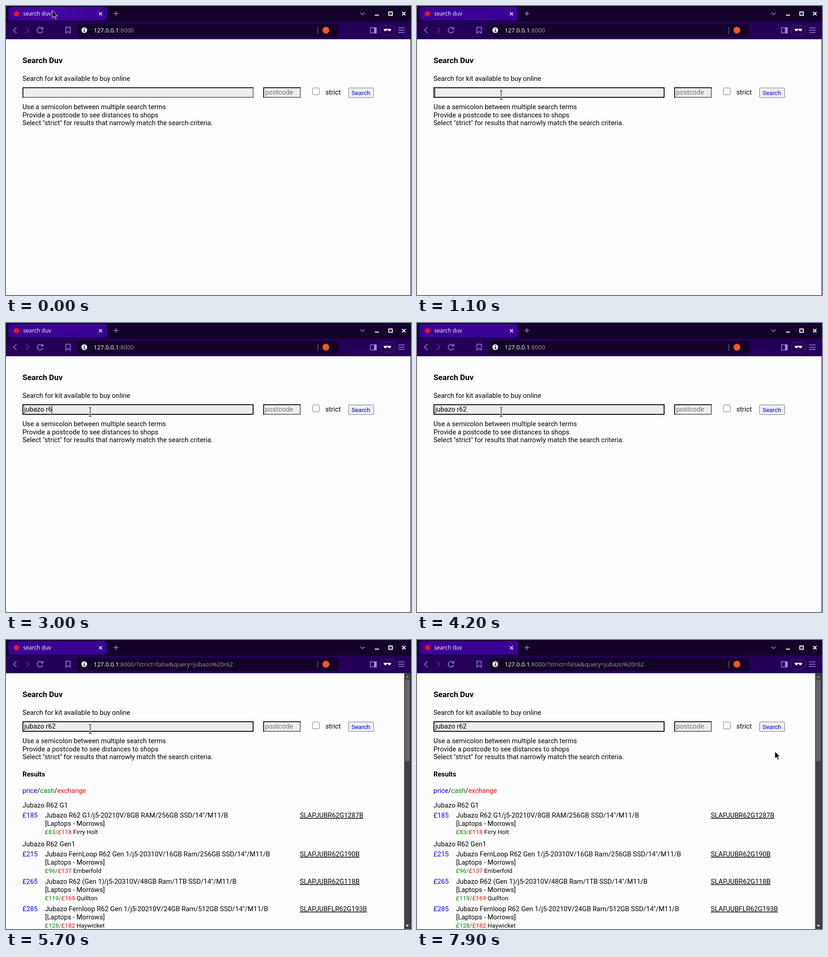
Animation of 885x633 px, one loop 8 s. Source, as an HTML page:

```html
<!DOCTYPE html>
<html lang="en">
<head>
<meta charset="utf-8">
<title>search duv</title>
<style>
  html, body { margin: 0; width: 100%; height: 100%; overflow: hidden; background: #fdfdfd; }
  svg { display: block; width: 885px; height: 633px; }
  text { font: 14.72px Roboto, sans-serif; white-space: pre; }
  .ui { font: 13px "Noto Sans", sans-serif; }
  .tab { font-size: 12px; }
  .bold { font-weight: bold; }
  .h3 { font-size: 17.22px; }
  .small { font-size: 13.333px; }
  .price { fill: #00f; }
  .cash { fill: #008000; }
  .exchange { fill: #f00; }
  .code { text-decoration: underline; }
  .icon { fill: none; stroke: #9a85ee; stroke-width: 1.5; }
  .white { fill: none; stroke: #fff; stroke-width: 2; }
</style>
</head>
<body>
<svg viewBox="0 0 885 633">
  <defs>
    <radialGradient id="glow" gradientUnits="userSpaceOnUse" cx="102" cy="12" r="110">
      <stop offset="0" stop-color="#4608a4"/><stop offset="1" stop-color="#3b0095"/>
    </radialGradient>
  </defs>

  <!-- window frame -->
  <rect width="885" height="72.5" fill="#140429"/>
  <rect y="34" width="885" height="38.5" fill="#240058"/>
  <path d="M884.5 72V633" stroke="#240058"/>
  <rect id="tab" x="5" y="2" width="216" height="30" rx="6" fill="#3b0095"/>
  <circle cx="23" cy="17" r="5.8" fill="#f0101c"/>
  <text class="ui tab" x="37.500" y="21" fill="#f1edfa">search duv</text>
  <path class="icon" d="M203 13.500l7 7m0-7l-7 7" style="stroke:#fff"/>
  <path class="icon" d="M235 16.500h10.500m-5.250-5.250v10.500"/>
  <path class="icon" d="M774.500 14.500l4.500 4.500 4.500-4.500"/>
  <path class="white" d="M806 20h9M836.500 13h7.500v7.500h-7.500zM865.500 13l7.500 7.500m0-7.500l-7.500 7.500"/>

  <!-- toolbar -->
  <path class="icon" d="M23 46.500l-6.500 6.500 6.500 6.500"/>
  <path class="icon" d="M43.500 46.500l6.500 6.500-6.500 6.500" style="stroke:#553a91"/>
  <path class="icon" d="M79.500 49.500a6.200 6.200 0 1 0 .8 5M80.500 46v4.500h-4.500"/>
  <path class="icon" d="M131 46.500h9.500v13l-4.750-3.500-4.750 3.500z"/>
  <rect x="156" y="39" width="571" height="29" rx="7" fill="#140429"/>
  <circle cx="171" cy="53" r="6.200" fill="#fff"/>
  <path d="M171 49v2m0 1.200v5" stroke="#140429" stroke-width="2"/>
  <text class="ui" x="191.500" y="58" fill="#f4f2f8">127.0.0.1<tspan id="address" fill="#948da1"></tspan></text>
  <path d="M681.500 46v15" stroke="#8c8598"/>
  <circle cx="699" cy="53" r="7.500" fill="#fb542b"/>
  <path class="icon" d="M796.500 47.500h12.500v11.500h-12.500z"/>
  <path d="M804 47h6v13h-6z" fill="#9a85ee"/>
  <rect x="818.500" y="42.500" width="30" height="21" rx="6" fill="none" stroke="#4b2a8c"/>
  <path d="M825 50h17v1.500h-1l-1 3.500h-4l-1.500-3h-2l-1.500 3h-4l-1-3.500h-1z" fill="#fff"/>
  <path class="icon" d="M857 48h14m-14 5h14m-14 5h14"/>

  <!-- search form -->
  <text class="bold h3" x="36" y="125">Search Duv</text>
  <text x="36" y="164">Search for kit available to buy online</text>
  <g id="fields" stroke-width="2"></g>
  <rect id="focus" x="37" y="179" width="503" height="21" rx="2" fill="#ededed" stroke="#101010" stroke-width="2"/>
  <text id="query" x="39.800" y="194"></text>
  <path id="caret" stroke="#000"/>
  <text x="566" y="194" fill="#757575">postcode</text>
  <rect x="669.500" y="179.500" width="15" height="15" rx="2.500" fill="#fff" stroke="#767676"/>
  <text x="698" y="194">strict</text>
  <rect x="748.500" y="179.500" width="55" height="21" rx="1" fill="#efefef" stroke="#767676"/>
  <text class="small price" x="755" y="195">Search</text>
  <text x="36" y="226">Use a semicolon between multiple search terms</text>
  <text x="36" y="244">Provide a postcode to see distances to shops</text>
  <text x="36" y="261">Select "strict" for results that narrowly match the search criteria.</text>

  <g id="results"></g>

  <path id="arrow" d="M0 0v16l3.700-3.400 2.700 6 2.400-1-2.600-6h4.900z" fill="#000" stroke="#fff"/>
  <g id="beam" fill="none">
    <path d="M-3.500-9.500h7M0-9.500v19M-3.500 9.500h7" stroke="#fff" stroke-width="3"/>
    <path d="M-3-9.500h2.500l.5.500.5-.5h2.500M0-9v18M-3 9.500h2.500l.5-.5.5.5h2.500" stroke="#000" stroke-width="1.200"/>
  </g>
</svg>
<script>
const $ = id => document.getElementById(id);
const text = (x, y, content, cls = "") => `<text x="${x}" y="${y}" class="${cls}">${content}</text>`;
const span = (cls, content) => `<tspan class="${cls}">${content}</tspan>`;

const field = (x, w) => `<rect x="${x}" y="178" width="${w}" height="23" fill="#ededed"/>
  <path fill="none" stroke="#767676" d="M${x} 200h${w - 1}v-22"/>
  <path fill="none" stroke="#1c1c1c" d="M${x + 1} 201v-22h${w - 1}"/>`;

const item = (y, price, name, cash, exchange, shop, code) =>
  text(36, y, "£" + price, "price") + text(85.5, y, name) + text(642, y, code, "code") +
  text(85.5, y + 18, "[Laptops - Morrows]") +
  text(85, y + 35.5, span("cash", `£${cash}/`) + span("exchange", "£" + exchange) + " " + shop, "small");

$("fields").innerHTML = field(36, 505) + field(562, 82);

$("results").innerHTML =
  `<path d="M870 72.500h14V633h-14z" fill="#424242"/>
   <path d="M872 87h10v178h-10z" fill="#686868"/>
   <path d="M873.500 82.500h7l-3.500-4z" fill="#8a8a8a"/>
   <path d="M873.500 624h7l-3.500 4z" fill="#fff"/>` +
  text(36, 299, "Results", "bold") +
  text(36, 335, span("price", "price") + "/" + span("cash", "cash") + "/" + span("exchange", "exchange")) +
  text(36, 367, "Jubazo R62 G1") +
  item(389, 185, 'Jubazo R62 G1/j5-20210V/8GB RAM/256GB SSD/14"/M11/B', 83, 118, "Firry Holt", "SLAPJUBR62G1287B") +
  text(36, 452, "Jubazo R62 Gen1") +
  item(474, 215, 'Jubazo FernLoop R62 Gen 1/j5-20310V/16GB Ram/256GB SSD/14"/M11/B', 96, 137, "Emberfold", "SLAPJUBR62G190B") +
  item(534, 265, 'Jubazo R62 (Gen 1)/j5-20310V/48GB Ram/1TB SSD/14"/M11/B', 119, 169, "Quillton", "SLAPJUBR62G118B") +
  item(594, 285, 'Jubazo Fernloop R62 Gen 1/j5-20210V/24GB Ram/512GB SSD/14"/M11/B', 128, 182, "Haywicket", "SLAPJUBFLR62G193B");

const QUERY = "jubazo r62";
const KEY_TIMES = [1500, 1600, 1800, 2000, 2200, 2300, 2400, 2600, 3000, 3600];
const CARET_TOGGLES = [1100, 4200, 4700, 5400, 6000, 6600, 7200, 7800];
const FOCUS = 1100, LOADED = 5700, STEP = 100, LOOP = 8000;

// pointer positions, one per step
const INTO_FIELD = [[101, 10], [107, 24], [122, 62], [142, 110], [160, 154], [174, 190], [182, 213], [185, 204], [184, 195]];
const TO_RESULTS = [[184, 195], [204, 201], [274, 226], [400, 254], [540, 269], [662, 271], [746, 259], [782, 244]];

const count = (times, t) => times.filter(at => at <= t).length;
const show = (id, on) => $(id).style.display = on ? "" : "none";

function pointer(t) {
  const [path, start] = t < 7200 ? [INTO_FIELD, 0] : [TO_RESULTS, 7200];
  return path[Math.min(path.length - 1, Math.floor((t - start) / STEP))];
}

function draw(t) {
  const typed = QUERY.slice(0, count(KEY_TIMES, t));
  const query = $("query");
  query.textContent = typed;
  const end = typed ? query.getComputedTextLength() : 0;
  $("caret").setAttribute("d", `M${Math.floor(39.9 + end) + 0.5} 181v17`);
  show("caret", count(CARET_TOGGLES, t) % 2);
  show("focus", t >= FOCUS);

  const loaded = t >= LOADED;
  show("results", loaded);
  $("address").textContent = ":8000" + (loaded ? "/?strict=false&query=" + encodeURIComponent(QUERY) : "");

  const [x, y] = pointer(t);
  const overText = x < 452 && y > 150 && y < 264;
  $("tab").setAttribute("fill", y < 32 ? "url(#glow)" : "#3b0095");
  show("beam", overText);
  show("arrow", !overText);
  $(overText ? "beam" : "arrow").setAttribute("transform", `translate(${x} ${y})`);
}

function tick() {
  draw(performance.now() % LOOP);
  requestAnimationFrame(tick);
}
tick();
</script>
</body>
</html>
```
